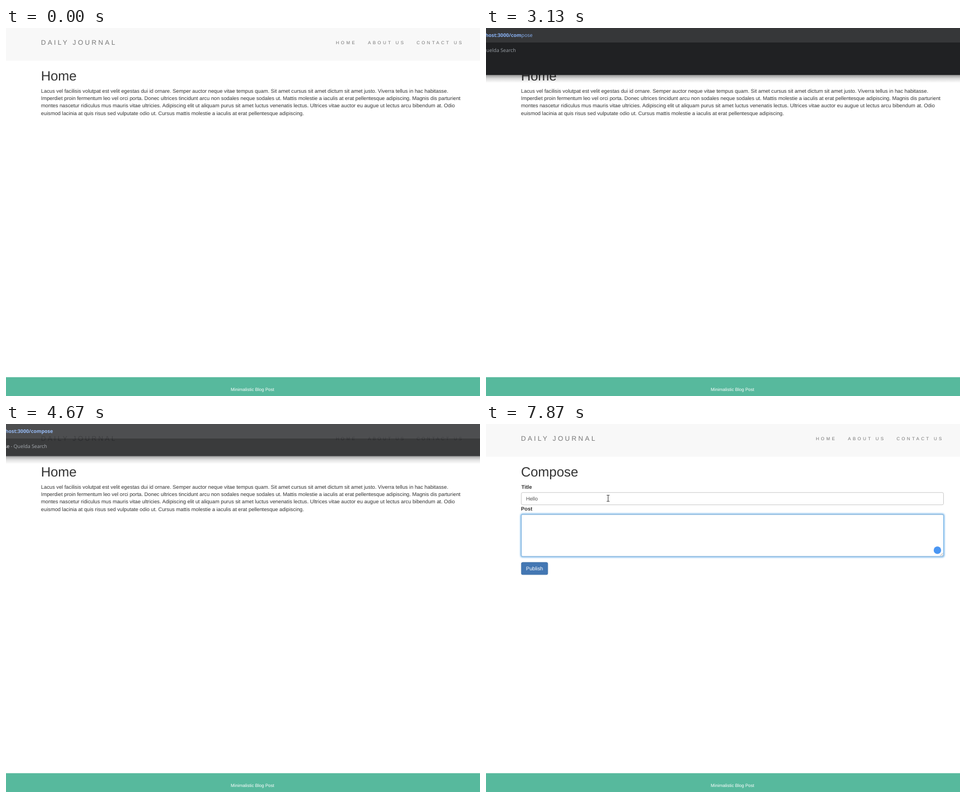
These frames come from a looping animation (850 px wide and 659 px high, 8 s). An HTML page:

```html
<!DOCTYPE html>
<html lang="en">
<head>
<meta charset="utf-8">
<title>Daily Journal</title>
<style>
  html, body { margin: 0; width: 100%; height: 100%; overflow: hidden; background: #fff; }
  svg { display: block; width: 850px; height: 659px; text-rendering: geometricPrecision; }
  text { font: 9.32px "Liberation Sans", Arial, sans-serif; fill: #333; white-space: pre; }
  .heading { font-size: 24px; }
  .label { font-weight: 700; }
  .brand { font-size: 12px; letter-spacing: 3.33px; fill: #777; }
  .nav { font-size: 8px; letter-spacing: 3.33px; fill: #777; }
  .mid { text-anchor: middle; fill: #fff; }
  .end { text-anchor: end; }
  #panel text { font: 8.9px "Open Sans", "Noto Sans", sans-serif; fill: #8ab4f8; }
  #panel .bold { font-weight: 700; }
  #panel .typed { fill: #e8eaed; }
  #panel .note { fill: #9aa0a6; }
</style>
</head>
<body>
<svg viewBox="0 0 850 659">
  <defs>
    <linearGradient id="shade" x2="0" y2="1">
      <stop offset="0" stop-opacity=".4"/>
      <stop offset=".45" stop-opacity=".14"/>
      <stop offset="1" stop-opacity="0"/>
    </linearGradient>
    <filter id="blur" x="-5%" y="-50%" width="110%" height="200%"><feGaussianBlur stdDeviation="1.5"/></filter>
  </defs>

  <rect width="850" height="659" fill="#fff"/>
  <rect width="850" height="58.7" fill="#f8f8f8"/>
  <text class="brand" x="62.7" y="30">DAILY JOURNAL</text>
  <text class="nav" x="591.5" y="28.7">HOME</text>
  <text class="nav" x="649" y="28.7">ABOUT US</text>
  <text class="nav" x="736.2" y="28.7">CONTACT US</text>
  <rect y="625.3" width="850" height="34" fill="#57b99d"/>
  <text class="mid" x="442" y="649.7" style="font-size:8px">Minimalistic Blog Post</text>

  <g id="home">
    <text class="heading" x="62.7" y="94">Home</text>
    <text x="62.8" y="115.7">Lacus vel facilisis volutpat est velit egestas dui id ornare. Semper auctor neque vitae tempus quam. Sit amet cursus sit amet dictum sit amet justo. Viverra tellus in hac habitasse.</text>
    <text x="62.8" y="129">Imperdiet proin fermentum leo vel orci porta. Donec ultrices tincidunt arcu non sodales neque sodales ut. Mattis molestie a iaculis at erat pellentesque adipiscing. Magnis dis parturient</text>
    <text x="62.8" y="142.3">montes nascetur ridiculus mus mauris vitae ultricies. Adipiscing elit ut aliquam purus sit amet luctus venenatis lectus. Ultrices vitae auctor eu augue ut lectus arcu bibendum at. Odio</text>
    <text x="62.8" y="155.7">euismod lacinia at quis risus sed vulputate odio ut. Cursus mattis molestie a iaculis at erat pellentesque adipiscing.</text>
  </g>

  <g id="compose">
    <text class="heading" x="62.7" y="94">Compose</text>
    <text class="label" x="63.4" y="115.7">Title</text>
    <text class="label" x="62.8" y="155">Post</text>
    <g id="title"></g>
    <g id="post"></g>
    <path d="M814.5 236L819.5 231M817.5 236L819.5 234" stroke="#888" stroke-width=".8"/>
    <text id="entry" x="71.7" y="137" style="fill:#555"></text>
    <path id="caret" stroke="#555" stroke-width=".8"/>
    <circle id="badge" cx="809.5" cy="226" r="6.7" fill="#4a96f3"/>
    <rect x="63.3" y="247.8" width="47.5" height="22" rx="2.5" fill="#4377b3" stroke="#386a9f" stroke-width=".67"/>
    <text class="mid" x="87" y="262.2">Publish</text>
  </g>

  <g id="panel">
    <rect id="shadow" width="850" height="14" fill="url(#shade)"/>
    <rect id="sheet" width="850" fill="#202123"/>
    <rect width="850" height="26" fill="#363739"/>
    <g id="address">
      <text class="bold end" x="44.7" y="16.2">localhost:3000/</text>
      <text x="44.7" y="16.2"><tspan id="typed" class="bold"></tspan><tspan id="hint"></tspan></text>
    </g>
    <path id="stub" d="M1.2 10H0V16.5H1.2" fill="none" stroke="#9aa0a6" stroke-width=".8"/>
    <text class="note" x="-31.7" y="42.7"><tspan id="query" class="typed"></tspan><tspan> - Quelda Search</tspan></text>
    <g id="rows"></g>
  </g>

  <path id="arrow" d="M0 0V11.5L2.7 9L4.5 13L6.3 12.2L4.6 8.3H8Z" fill="#fff" stroke="#222" stroke-width=".7"/>
  <path id="beam" d="M-2.5 -5.5H-.6L0 -5L.6 -5.5H2.5M0 -5V5M-2.5 5.5H-.6L0 5L.6 5.5H2.5" fill="none" stroke="#444" stroke-width="1.1"/>
</svg>
<script>
const LOOP = 8000;
const $ = id => document.getElementById(id);
const show = (id, on) => { $(id).style.display = on ? "" : "none"; };
const clamp = v => Math.max(0, Math.min(1, v));
const latest = (list, t) => list.filter(item => item.at <= t).pop();

function buildField(id, y, height) {
  const box = `x="63.3" y="${y}" width="757.2" height="${height}" rx="2.5"`;
  $(id).innerHTML =
    `<rect class="glow" ${box} fill="none" stroke="#66afe9" stroke-width="3" filter="url(#blur)"/>
     <rect ${box} fill="#fff" stroke="#c4c4c4" stroke-width=".9"/>
     <rect class="glow" ${box} fill="none" stroke="#78b3e8" stroke-width="1"/>`;
}
buildField("title", 122.7, 22);
buildField("post", 162, 75.2);

function focusField(id, amount) {
  for (const glow of $(id).querySelectorAll(".glow")) glow.style.opacity = amount;
}

// Address bar states; "lost" hides the address when nothing matches.
const suggestions = [
  { at: 2730, typed: "", hint: "compose", count: 5, rows: ["", "contact", "about"] },
  { at: 2930, typed: "c", hint: "ompose", count: 4, rows: ["contact"] },
  { at: 3070, typed: "co", hint: "mpose", count: 4, rows: ["contact"] },
  { at: 3130, typed: "com", hint: "pose", count: 3 },
  { at: 3270, typed: "comp", hint: "ose", count: 4 },
  { at: 3400, typed: "comp", hint: "ose", count: 3 },
  { at: 3530, typed: "comps", hint: "", count: 3 },
  { at: 3730, typed: "compso", hint: "", count: 3, lost: true },
  { at: 3870, typed: "comps", hint: "", count: 2, lost: true },
  { at: 3930, typed: "comp", hint: "", count: 3, lost: true },
  { at: 4130, typed: "comp", hint: "ose", count: 3 },
  { at: 4270, typed: "compo", hint: "se", count: 4 },
  { at: 4330, typed: "compos", hint: "e", count: 3 },
  { at: 4470, typed: "compose", hint: "", count: 2 }
];

const entries = [
  { at: 0, text: "" }, { at: 6470, text: "H" }, { at: 6670, text: "He" },
  { at: 6870, text: "Hel" }, { at: 6930, text: "Hell" }, { at: 7070, text: "Hello" }
];

function rowMarkup(page, i) {
  const y = 69.2 + i * 26.6;
  return page
    ? `<text class="bold end" x="44.7" y="${y}">localhost:3000/</text><text x="44.7" y="${y}">${page}</text>`
    : `<text class="bold end" x="41" y="${y}">localhost:3000</text>`;
}

let shown;
function drawPanel(t) {
  const open = t >= 2730 && t < 4730;
  show("panel", open);
  if (!open) return;
  $("panel").style.opacity = t < 2800 || t >= 4670 ? 0.88 : 1;
  const state = latest(suggestions, t);
  if (state === shown) return;
  shown = state;
  const bottom = 57.7 + (state.count - 2) * 26.6;
  $("sheet").setAttribute("y", 26);
  $("sheet").setAttribute("height", bottom - 26);
  $("shadow").setAttribute("y", bottom);
  $("typed").textContent = $("query").textContent = state.typed;
  $("hint").textContent = state.hint;
  show("address", !state.lost);
  show("stub", state.lost);
  $("rows").innerHTML = (state.rows || []).map(rowMarkup).join("");
}

function drawForm(t) {
  const composing = t >= 4800;
  show("home", !composing);
  show("compose", composing);
  if (!composing) return;
  const toPost = clamp((t - 7330) / 150);
  focusField("title", clamp((t - 5930) / 130) * (1 - toPost));
  focusField("post", toPost);
  show("badge", t >= 7530);
  $("entry").textContent = latest(entries, t).text;
  const inPost = t >= 7330;
  const x = inPost ? 72.4 : 72.2 + $("entry").getComputedTextLength();
  $("caret").setAttribute("d", inPost ? "M72.4 167V178" : `M${x} 128V139`);
  show("caret", t >= 5930 && t < 7870);
}

const quadratic = (a, b, c, p) => (1 - p) ** 2 * a + 2 * p * (1 - p) * b + p * p * c;

function drawPointer(t) {
  let x, y, beam = false, visible = true;
  if (t >= 330 && t < 800) {
    const p = (t - 330) / 470;
    x = quadratic(-8, 3, -4, p);
    y = quadratic(3, 0, -13, p);
  } else if (t >= 5200) {
    const p = clamp((t - 5200) / 800);
    const eased = p * (2 - p);
    x = quadratic(47, 95, 219, eased);
    y = quadratic(27, 220, 133, eased);
    beam = x > 63 && (y > 122 && y < 145 || y > 162);
  } else visible = false;
  show("arrow", visible && !beam);
  show("beam", visible && beam);
  if (visible) $(beam ? "beam" : "arrow").setAttribute("transform", `translate(${x} ${y})`);
}

function draw(t) {
  drawForm(t);
  drawPanel(t);
  drawPointer(t);
}

const start = performance.now();
function tick() {
  draw((performance.now() - start) % LOOP);
  requestAnimationFrame(tick);
}
tick();
</script>
</body>
</html>
```
